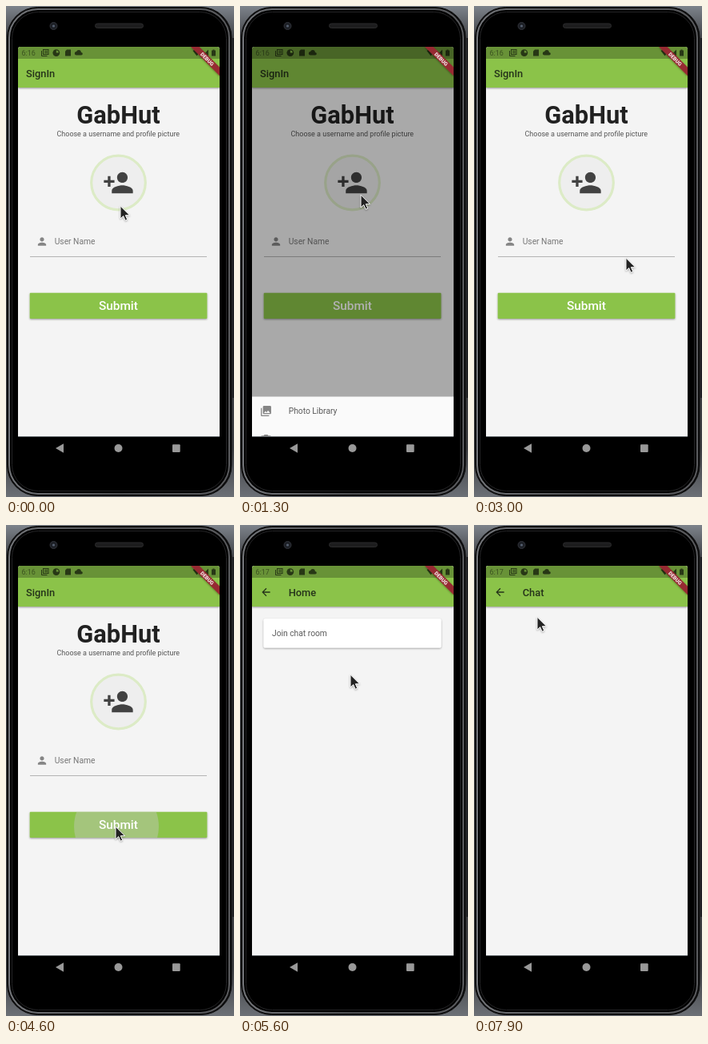
Animation of 285 by 614 pixels, one loop 8000 ms. Source, as an HTML page:

```html
<!DOCTYPE html>
<html lang="en">
<head>
<meta charset="utf-8">
<title>Sign-in flow</title>
<style>
  html, body { margin: 0; width: 100%; height: 100%; overflow: hidden; background: #15171b; }
  svg { display: block; width: 100%; height: 100%; font-family: Roboto, sans-serif; font-size: 10.27px; }
  .title { font-size: 12.83px; font-weight: 500; fill: #25331a; }
  .item { fill: #5a5a5a; }
  .icon { fill: #858585; }
</style>
</head>
<body>
<svg viewBox="0 0 285 614">
  <defs>
    <linearGradient id="backdrop" x2="0" y2="1">
      <stop offset="0" stop-color="#7d838b"/>
      <stop offset=".06" stop-color="#46484c"/>
      <stop offset=".9" stop-color="#3c3d40"/>
      <stop offset="1" stop-color="#6c7076"/>
    </linearGradient>
    <linearGradient id="rim">
      <stop offset="0" stop-color="#74767a"/>
      <stop offset=".5" stop-color="#4c4d50"/>
      <stop offset="1" stop-color="#5a5b5e"/>
    </linearGradient>
    <filter id="shadow" x="-10%" y="-30%" width="120%" height="180%">
      <feDropShadow dx="0" dy="1" stdDeviation="1.2" flood-opacity=".38"/>
    </filter>
    <filter id="pointerShadow" x="-40%" y="-30%" width="180%" height="170%">
      <feDropShadow dx="0" dy="1" stdDeviation=".8" flood-opacity=".35"/>
    </filter>
    <clipPath id="screen"><path d="M15 54a3 3 0 0 1 3-3h246a3 3 0 0 1 3 3v484H15z"/></clipPath>
    <clipPath id="buttonClip"><rect x="29.7" y="358.7" width="221.7" height="32.3" rx="1"/></clipPath>
    <g id="page">
      <rect x="15" y="51" width="252" height="487" fill="#f4f4f4"/>
      <rect x="15" y="51" width="252" height="51" fill="#8bc34a" filter="url(#shadow)"/>
    </g>
    <path id="back" fill="#25331a" transform="translate(24.8 76.3) scale(.642)"
      d="M20 11H7.83l5.59-5.59L12 4l-8 8 8 8 1.41-1.41L7.83 13H20z"/>
  </defs>

  <!-- Phone body -->
  <rect width="285" height="614" fill="url(#backdrop)"/>
  <rect x="283" y="40" width="2" height="450" fill="#1e1f22"/>
  <rect x="1.5" y="1.5" width="280.5" height="611" rx="38" fill="#0b0b0c" stroke="#111"/>
  <rect x="4" y="4" width="275" height="606" rx="36" fill="#000" stroke="url(#rim)" stroke-width="2"/>
  <rect x="7.5" y="7.5" width="268" height="599" rx="33" fill="#000" stroke="#252527"/>
  <circle cx="59.5" cy="25" r="4.5" fill="#1d2026" stroke="#303238"/>
  <circle cx="59.5" cy="25" r="1.6" fill="#566071"/>
  <rect x="111.5" y="22" width="60" height="5.5" rx="2.7" fill="#1d1d1e" stroke="#2b2b2c"/>
  <rect x="15" y="538" width="252" height="1" fill="#666c70"/>
  <g fill="#999">
    <path d="M62 553l10-5.7v11.4z"/><circle cx="140.5" cy="553" r="5"/>
    <rect x="208" y="548.2" width="9.7" height="9.7" rx="1"/>
  </g>

  <g clip-path="url(#screen)">
    <!-- Sign-in -->
    <use href="#page"/>
    <text class="title" x="25" y="89">SignIn</text>
    <g text-anchor="middle">
      <text x="140.5" y="147" font-size="30.8" font-weight="700" fill="#212121">GabHut</text>
      <text x="140.3" y="163" font-size="8.98" fill="#555">Choose a username and profile picture</text>
    </g>
    <circle cx="140.5" cy="221" r="33.8" fill="#eee" stroke="#dcebc6" stroke-width="3.2"/>
    <path fill="#424242" transform="translate(120.7 201.2) scale(1.65)"
      d="M15 12c2.21 0 4-1.79 4-4s-1.79-4-4-4-4 1.79-4 4 1.79 4 4 4zm-9-2V7H4v3H1v2h3v3h2v-3h3v-2zm9 4c-2.67 0-8 1.34-8 4v2h16v-2c0-2.66-5.33-4-8-4z"/>
    <path class="icon" transform="translate(37.3 286.8) scale(.642)"
      d="M12 12c2.21 0 4-1.79 4-4s-1.79-4-4-4-4 1.79-4 4 1.79 4 4 4zm0 2c-2.67 0-8 1.34-8 4v2h16v-2c0-2.66-5.33-4-8-4z"/>
    <text x="60.7" y="298" fill="#777">User Name</text>
    <path d="M30 313.5h221" stroke="#b4b4b4"/>
    <rect x="29.7" y="358.7" width="221.7" height="32.3" rx="1" fill="#8bc34a" filter="url(#shadow)"/>
    <circle id="ripple" cx="138" cy="377" r="53" fill="#c8c8c8" opacity=".4" clip-path="url(#buttonClip)"/>
    <text x="140.4" y="380" font-size="15.4" font-weight="500" fill="#fff" text-anchor="middle">Submit</text>

    <!-- Home -->
    <g id="home">
      <use href="#page"/><use href="#back"/>
      <text class="title" x="60.7" y="89">Home</text>
      <rect x="29.5" y="117" width="222" height="36.5" rx="2.6" fill="#fff" filter="url(#shadow)"/>
      <text class="item" x="40" y="139">Join chat room</text>
    </g>

    <!-- Chat -->
    <g id="chat">
      <use href="#page"/><use href="#back"/>
      <text class="title" x="60.7" y="89">Chat</text>
    </g>

    <rect id="scrim" x="15" y="51" width="252" height="487"/>
    <g id="sheet">
      <rect x="15" y="465.5" width="252" height="73" fill="#fafafa"/>
      <path class="icon" transform="translate(24.8 475.8) scale(.642)"
        d="M22 16V4c0-1.1-.9-2-2-2H8c-1.1 0-2 .9-2 2v12c0 1.1.9 2 2 2h12c1.1 0 2-.9 2-2zm-11-4l2.03 2.71L16 11l4 5H8zM2 6v14c0 1.1.9 2 2 2h14v-2H4V6z"/>
      <text class="item" x="60.7" y="487">Photo Library</text>
      <g class="icon" transform="translate(24.8 511.7) scale(.642)">
        <circle cx="12" cy="12" r="3.2"/>
        <path d="M9 2L7.17 4H4c-1.1 0-2 .9-2 2v12c0 1.1.9 2 2 2h16c1.1 0 2-.9 2-2V6c0-1.1-.9-2-2-2h-3.17L15 2zm3 15c-2.76 0-5-2.24-5-5s2.24-5 5-5 5 2.24 5 5-2.24 5-5 5z"/>
      </g>
      <text class="item" x="60.7" y="523">Camera</text>
    </g>

    <!-- Status bar -->
    <rect x="15" y="51" width="252" height="15" opacity=".25"/>
    <g opacity=".62">
      <text id="clock" x="19.5" y="61.8" font-size="9" opacity=".7"></text>
      <path d="M44.5 56v6.5h7" fill="none" stroke="#000"/>
      <rect x="46.5" y="54.5" width="6.5" height="6" fill="none" stroke="#000"/>
      <path d="M48 56h4v1h-4zM48 58h4v1h-4z"/>
      <circle cx="62.8" cy="58.6" r="4.4"/>
      <path d="M62.8 55.6v3h3a3 3 0 0 0-3-3z" fill="#689238"/>
      <path d="M76 54.5h5v8h-7v-6z"/>
      <path d="M88 61.5a2.2 2.2 0 0 1 0-4.4 3.1 3.1 0 0 1 6 .8 1.8 1.8 0 0 1 0 3.6z"/>
      <path d="M233.5 56q5-4 10 0l-5 6.5zM253 54.5v8h-8zM257 55.5h1.5v-1h2v1h1.5v7h-5z"/>
    </g>

    <!-- Debug ribbon -->
    <path d="M231 51h10.6L267 76.4v10.9z" fill="#972a30" filter="url(#shadow)"/>
    <text transform="translate(251.5 66.5) rotate(45)" y="2.3" font-size="6.5" font-weight="900" fill="#f4e8e8" text-anchor="middle">DEBUG</text>
  </g>

  <path id="cursor" d="M0 1.2v15.8l3.7-3.4 2.4 5.6 2.6-1.1-2.4-5.4h5.2z"
    fill="#222" stroke="#f4f4f4" filter="url(#pointerShadow)"/>
</svg>

<script>
const LOOP = 8000, STEP = 100;
const el = id => document.getElementById(id);
const clamp = v => Math.max(0, Math.min(1, v));

// time, x, y of the pointer tip
const pointerPath = [
  [0, 143, 249], [100, 141, 258], [300, 137, 277], [600, 151, 235], [2900, 151, 235],
  [3000, 190, 314], [3600, 138, 377], [3800, 138, 377], [3900, 137, 376], [4800, 137, 376],
  [4900, 138, 366], [5200, 138, 366], [5700, 138, 141], [5800, 140, 138],
  [7700, 140, 138], [7800, 106, 125], [7900, 79, 114]
];

function pointerAt(t) {
  const next = pointerPath.findIndex(p => p[0] > t);
  if (next < 0) return pointerPath.at(-1).slice(1);
  const [a, b] = [pointerPath[next - 1], pointerPath[next]];
  const k = (t - a[0]) / (b[0] - a[0]);
  return [a[1] + (b[1] - a[1]) * k, a[2] + (b[2] - a[2]) * k];
}

function show(node, visible) {
  node.style.display = visible ? "" : "none";
}

function move(node, x, y) {
  node.setAttribute("transform", `translate(${x} ${y})`);
}

// A new page fades in while rising a quarter of the screen.
function enterPage(node, progress) {
  show(node, progress > 0);
  node.setAttribute("opacity", progress ** 1.7);
  move(node, 0, 122 * (1 - progress) ** 2.4);
}

function draw(t) {
  const sheetOpen = t >= 1300 && t < 3000;
  show(el("sheet"), sheetOpen);
  show(el("scrim"), sheetOpen);
  move(el("sheet"), 0, t < 1400 ? 23 : t < 1500 ? 4 : 0);
  el("scrim").setAttribute("opacity", t < 1400 ? .31 : t < 1500 ? .47 : .54);

  show(el("ripple"), t >= 4600 && t < 4900);
  enterPage(el("home"), clamp((t - 4870) / 300));
  enterPage(el("chat"), t < 7000 ? 0 : t < 7200 ? .85 : 1);
  el("clock").textContent = t < 5500 ? "6:16" : "6:17";
  move(el("cursor"), ...pointerAt(t));
}

const start = performance.now();
function tick() {
  const t = (performance.now() - start) % LOOP;
  draw(Math.floor(t / STEP) * STEP);
  requestAnimationFrame(tick);
}
tick();
</script>
</body>
</html>
```
